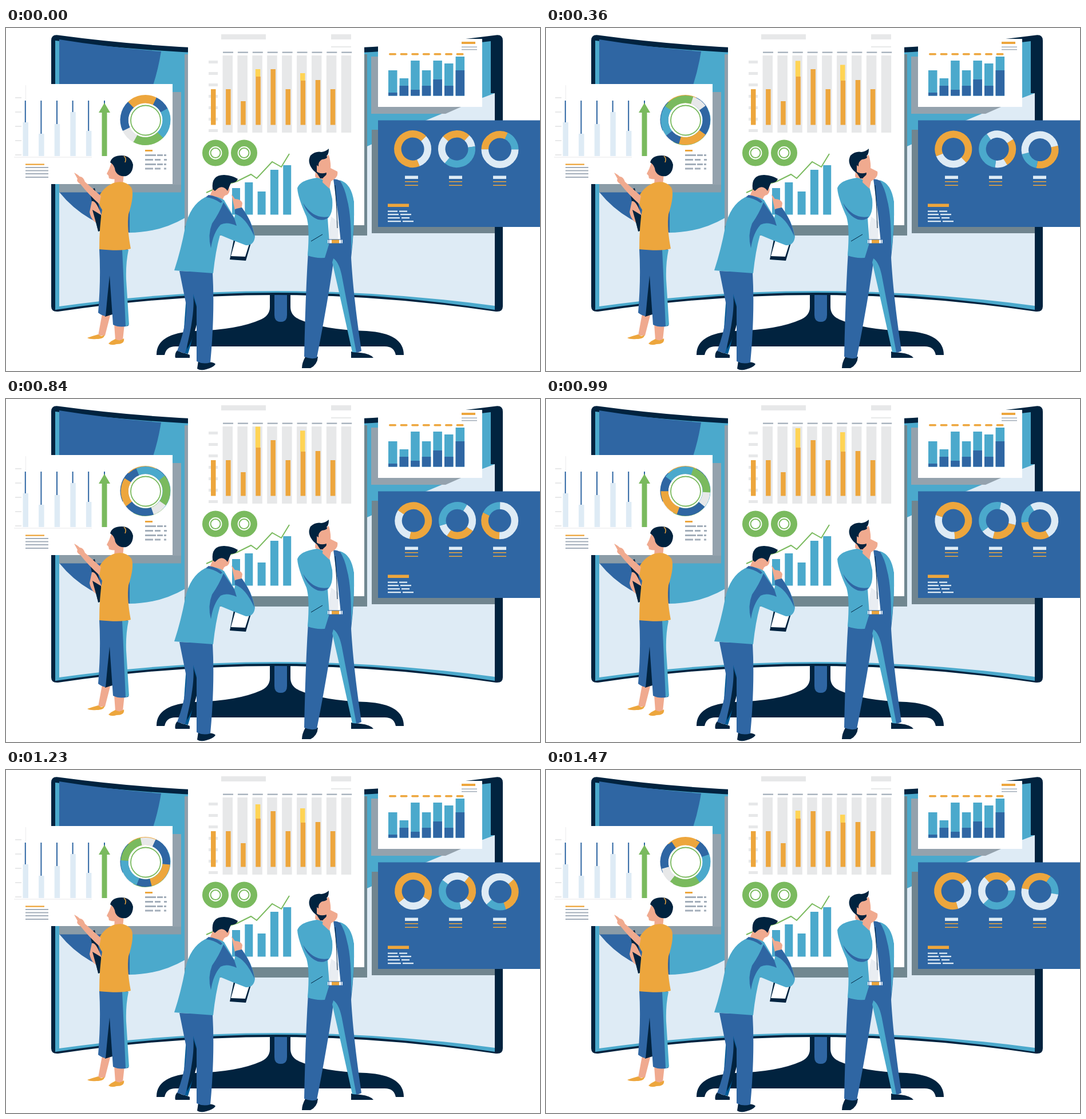
Animation of 933 by 600 pixels, one loop 1500 ms. Source, as an HTML page:

```html
<!DOCTYPE html>
<html lang="en">
<head>
<meta charset="utf-8">
<title>Dashboard team</title>
<style>
html, body { margin: 0; width: 100%; height: 100%; overflow: hidden; background: #fff; }
svg { display: block; width: 933px; height: 600px; }
</style>
</head>
<body>
<svg id="stage" viewBox="0 0 933 600"></svg>
<script>
const NAVY = '#01233f', BLUE = '#2f66a3', TEAL = '#4ba9cc', PALE = '#deebf5', ORANGE = '#eda63d',
  YELLOW = '#ffd455', GREEN = '#7aba5e', GREY = '#a3aeba', LIGHT = '#e7e8e9', SKIN = '#f0aa8f', WHITE = '#fff';

const stage = document.getElementById('stage');
let out = '';
const rect = (x, y, w, h, fill, extra = '') =>
  out += `<rect x="${x}" y="${y}" width="${w}" height="${h}" fill="${fill}" ${extra}/>`;
const path = (fill, d) => out += `<path fill="${fill}" d="${d}"/>`;
const line = (color, width, d) =>
  out += `<path fill="none" stroke="${color}" stroke-width="${width}" d="${d}"/>`;
const ring = (x, y, r, width, color, extra = '') =>
  out += `<circle cx="${x}" cy="${y}" r="${r}" fill="none" stroke="${color}" stroke-width="${width}" ${extra}/>`;
const rows = (x, w, color, height, ys) => ys.forEach(y => rect(x, y, w, height, color));

// Segments are [colour, start angle], clockwise from the top.
function donut(x, y, outer, inner, segments, id = '') {
  out += `<g id="${id}">`;
  segments.forEach(([color, start], i) => {
    const end = segments[(i + 1) % segments.length][1];
    const sweep = (end - start + 360) % 360 + 0.5;
    ring(x, y, (outer + inner) / 2, outer - inner, color,
      `pathLength="360" stroke-dasharray="${sweep} 360" transform="rotate(${start - 90} ${x} ${y})"`);
  });
  out += '</g>';
}

function drawMonitor() {
  rect(461, 460, 36, 60, NAVY);
  path(NAVY, 'M263 572Q262 534 330 530Q405 528 445 510Q461 503 461 488H497Q497 503 513 510Q555 528 630 530Q695 534 695 572H681Q678 557 662 557H296Q280 557 277 572Z');
  path(BLUE, 'M469 466H491V502Q491 514 480 514Q469 514 469 502Z');
  path(NAVY, 'M79 22Q79 11 91 12.500Q280 38 473 38T856 12.500Q868 11 868 22V487Q868 497 856 496Q660 467 473 467T91 496Q79 497 79 487Z');
  path(TEAL, 'M86 22Q290 47 473 47T847 23V114H854V493Q660 463 473 463T86 493Z');
  path(PALE, 'M93 270L313 300L631 207Q745 154 854 114V486Q660 460 473 460T93 487Z');
  path(TEAL, 'M200 285H313V332Q268 358 215 358Z');
  path(BLUE, 'M93 20Q180 34 271 41Q266 72 257 100H93Z');
  path(BLUE, 'M93 287H216V358Q140 345 93 287Z');
}

function drawLeftPanel() {
  rect(93, 112, 213, 175.500, '#8b9ca7');
  rect(291, 112, 15, 162, '#94a2ad');
  rect(0, 98, 291, 175, WHITE);
  rows(16, 11, LIGHT, 2, [121, 146, 171, 196, 221]);
  rect(14, 225.500, 136, 1, LIGHT);
  rect(34, 100, 0.800, 26, LIGHT);
  [165, 185, 168, 147, 180].forEach((y, i) => {
    const x = 29.500 + i * 27.600;
    rect(x, y, 9.500, 224 - y, PALE);
    rect(x + 3.300, 127, 2, y - 127, BLUE);
  });
  rect(171, 127, 2, 6, BLUE);
  path(GREEN, 'M172 131L182 148H176.500V224H167.500V148H162Z');
  rect(34, 237.500, 33, 2.300, ORANGE);
  rows(34, 40, GREY, 2, [243, 248.500, 254, 260]);
  rect(243, 213, 13, 3, ORANGE);
  [221, 229, 237, 244.500].forEach((y, i) => {
    rect(243, y, 19 - i % 2 * 5, 3, GREY);
    rect(264 - i % 2 * 4, y, 10, 3, GREY);
    rect(276, y, i === 1 ? 5 : 4, 3, GREY);
  });
  const parts = [[ORANGE, 316], [BLUE, 26], [TEAL, 62], [GREEN, 135], [LIGHT, 209], [BLUE, 245]];
  donut(243.500, 161, 44, 30, parts);
  donut(243.700, 161.400, 43.200, 30, parts, 'd0');
  ring(244, 161.500, 26, 1.800, GREEN);
}

function drawCentrePanel() {
  rect(312, 46, 319, 317, '#708790');
  rect(312, 46, 6, 300, '#909fab');
  rect(318, 0, 308, 345, WHITE);
  rect(376, 11, 78, 9, LIGHT);
  rect(568, 11, 35, 9, LIGHT);
  rect(568, 32, 35, 2, LIGHT);
  rows(354, 16, LIGHT, 5, [57, 77, 97, 117, 137, 157, 177]);
  const tops = [107, 107, 128, 85, 72, 107, 92, 91, 107];
  tops.forEach((y, i) => {
    rect(379 + i * 25.900, 41.500, 18, 2.300, GREY);
    rect(378.500 + i * 25.900, 48, 17.500, 135, LIGHT);
  });
  tops.forEach((y, i) => rect(358 + i * 26.100, y, 8.500, 169.500 - y, ORANGE));
  rect(435.800, 72, 8.500, 13, YELLOW, 'id="b0"');
  rect(514, 79, 8.500, 13, YELLOW, 'id="b1"');
  [366, 416].forEach(x => {
    ring(x, 218.500, 17.200, 11.600, GREEN);
    ring(x, 218.500, 8.500, 2, GREEN);
  });
  [280, 270, 286, 248, 240].forEach((y, i) => rect(395 + i * 22.300, y, 14, 326.500 - y, TEAL));
  line(GREEN, 2, 'M350 288L372 278L404 268L428 256L438 263L465 234L481 243L495 220');
}

function drawRightPanels() {
  path('#94a2ad', 'M638 50H660V138H795L768 150H638Z');
  rect(650, 19, 182, 119, WHITE);
  rect(650, 8, 147, 20, WHITE);
  const tops = [74, 88, 57, 74, 57, 62, 50], splits = [113, 101, 108, 101, 90, 101, 74];
  tops.forEach((y, i) => {
    const x = 668 + i * 19.600;
    rect(x + 1, 44, 13, 3.500, ORANGE, 'rx="1.700"');
    rect(x, y, 15.500, 118.500 - y, TEAL);
    rect(x, splits[i], 15.500, 118.500 - splits[i], BLUE);
  });
  rect(796, 24, 24, 4, ORANGE);
  rows(796, 27, GREY, 1.500, [32.500, 37]);
  rect(639, 178, 215, 181, '#71858f');
  rect(650, 161.500, 283, 186.500, BLUE);
  donut(710.600, 211.600, 32.500, 20, [[PALE, 46], [ORANGE, 158]], 'd1');
  donut(787.500, 211.600, 32.500, 20, [[ORANGE, 312], [PALE, 43], [TEAL, 82], [PALE, 220]], 'd2');
  donut(863, 212.500, 32.500, 20, [[ORANGE, 270], [TEAL, 25], [PALE, 90]], 'd3');
  [697, 774, 851].forEach(x => {
    rect(x, 258.500, 23, 5.500, PALE);
    rows(x, 23, ORANGE, 1.500, [268, 274.500]);
  });
  rect(667, 307.500, 37, 5.500, ORANGE);
  [319.500, 325, 331, 337].forEach((y, i) => {
    rect(667, y, 17 + i * 2, 2.300, PALE);
    rect(687 + i * 2, y, i % 2 ? 19 : 14, 2.300, PALE);
  });
}

function drawWoman() {
  path(SKIN, 'M168 500L182 503L173 538L161 538Z M189 518H207L204 546L191 546Z');
  path(ORANGE, 'M161 536Q166 541 172 537Q172 544 158 544Q147 545 142 542Q150 539 161 536Z M191 544Q199 549 206 543Q208 553 193 553Q184 556 179 552Q184 547 191 544Z');
  path(NAVY, 'M172 425H190L186 501L173 505Z');
  path(BLUE, 'M163 386H213L206 430L214 521Q198 525 187 519L181 433Q177 470 174 504Q167 503 161 498Q166 440 163 386Z');
  path(TEAL, 'M203 388H214Q209 412 210 440L215 519L209 522L205 430Z');
  path(NAVY, 'M146 284L155 280L171 353L161 356Z');
  path(SKIN, 'M150 303Q157 300 168 330L170 345Q150 343 146 322Z');
  path(NAVY, 'M151 318L166 327L170 353L160 351Z');
  path(SKIN, 'M190 260L206 255L204 275L189 274Z');
  path(ORANGE, 'M188 271Q208 265 219 279Q225 292 214 326Q211 350 218 386Q202 391 163 387Q163 346 168 318Q162 309 160 300Q168 279 188 271Z');
  path(SKIN, 'M119 253Q125 256 129 260Q135 260 138 269L166 294L163 308Q145 292 130 273Q122 268 125 264Z');
  path(SKIN, 'M184 236L201 240L200 261Q193 267 180 263L179 258L176 255Q181 246 184 236Z');
  path(NAVY, 'M182 235Q185 223 202 223Q218 223 222 239Q222 254 210 259Q196 261 191 250Q190 240 182 235Z');
  line(ORANGE, 1.500, 'M206 224Q211 228 208 235');
}

function drawLeaningMan() {
  path(NAVY, 'M299 564L308 568Q318 570 321 572V577H296Q294 570 299 564Z M336 582L349 585Q362 583 366 588Q362 594 350 597Q340 600 334 596Z');
  path('#015b96', 'M318 427H338Q340 500 318 570L308 568Z');
  path(NAVY, 'M324 460L337 500Q330 540 316 562Z');
  path(BLUE, 'M303 425L361 427Q365 500 357 585Q345 589 333 583L333 485L327 465Q331 500 313 569L299 565Q316 520 315 485Z');
  path(NAVY, 'M400 360L428 376L419 407L391 405Z');
  path(WHITE, 'M403 363L425 378L418 400L393 399Z');
  path(SKIN, 'M362 280L388 275Q394 286 386 292Q380 292 378 303L356 294Z');
  path(NAVY, 'M361 282Q358 257 381 257Q396 258 405 264Q403 271 393 271Q390 278 387 285Q380 275 371 280L365 285Z');
  path(SKIN, 'M394 291L400 299Q410 299 413 306L411 320L400 319Z');
  path(TEAL, 'M348 296Q365 291 381 301L399 332L402 316L412 314Q430 337 435 365Q433 381 419 380Q395 371 374 362Q366 390 362 429L294 424Q306 387 313 349Q321 310 348 296Z');
  path(BLUE, 'M380 305L399 333L403 346Q386 338 375 344Q362 358 358 385Q352 362 360 342Q372 325 380 305Z');
  path(BLUE, 'M349 296L354 292Q370 294 378 304L375 306Q362 297 349 296Z M400 317L412 314Q431 340 434 365Q419 331 400 325Z');
}

function drawThinkingMan() {
  path(NAVY, 'M523 575H545Q544 589 532 595H517Q517 586 523 575Z M603 566L619 568Q637 570 642 577H603Z');
  path(BLUE, 'M528 390L545 377H602Q604 450 621 565Q614 569 606 567L572 410Q562 480 543 577Q533 580 521 575Q523 470 528 390Z');
  path(TEAL, 'M572 403Q583 410 588 440L612 567L605 567Q586 480 570 410Z');
  path(WHITE, 'M552 264L578 265L587 372L560 374Z');
  path('#e9edf2', 'M568 330L582 340L580 369L561 371Z');
  path(BLUE, 'M572 264Q599 266 608 305Q609 350 603 402L586 385L580 325Z');
  path(TEAL, 'M583 266Q604 272 608 305Q609 350 603 394Q604 330 596 300Q592 280 583 266Z');
  path(SKIN, 'M542 235L564 222Q568 236 567 245L579 251Q581 261 570 265L551 270L540 260Z');
  path(NAVY, 'M540 249Q548 257 560 253L559 263L549 263Z');
  path(NAVY, 'M538 250Q525 236 532 223Q541 215 551 217Q559 216 564 211Q564 221 560 224Q564 228 552 230Q545 234 546 242L543 240L543 254Z');
  path(TEAL, 'M543 262Q558 264 565 278L570 299Q572 325 562 333L565 376L557 402Q540 403 527 398Q531 350 525 330Q510 297 509 280Q514 266 543 262Z');
  path(SKIN, 'M554 262Q568 247 579 253Q580 262 568 268L565 281L553 270Z');
  path(BLUE, 'M519 306Q537 335 564 330Q558 338 545 335Q527 328 519 306Z');
  line(NAVY, 1, 'M533 373L553 361M575 275Q578 310 579 350');
  rect(562, 370, 26, 7, WHITE);
  rect(569, 370, 13, 7, ORANGE);
  line(BLUE, 1, 'M562 370H588M562 377H588M564 370V377M586 370V377');
}

drawMonitor();
drawLeftPanel();
drawCentrePanel();
drawRightPanels();
drawWoman();
drawLeaningMan();
drawThinkingMan();
stage.innerHTML = out;

const spinners = [[280, 243.7, 161.3], [148, 711, 212.4], [174, 788, 212.2], [275, 863, 212.8]]
  .map(([turn, x, y], i) => ({ el: document.getElementById('d' + i), turn, x, y }));
const growers = [[72, 85], [79, 92]]
  .map(([top, base], i) => ({ el: document.getElementById('b' + i), top, base }));

// Out and back around 766 ms, starting quicker than it settles.
function progress(t) {
  const u = Math.max(0, Math.min(1, (736 - Math.abs(t - 766)) / 736)) ** 0.7;
  return u * u * (3 - 2 * u);
}

function frame(now) {
  const p = progress(Math.floor(now / 30) * 30 % 1500);
  for (const { el, turn, x, y } of spinners) el.setAttribute('transform', `rotate(${turn * p} ${x} ${y})`);
  for (const { el, top, base } of growers) {
    const y = top - 24 * p;
    el.setAttribute('y', y);
    el.setAttribute('height', base - y);
  }
  requestAnimationFrame(frame);
}
frame(performance.now());
</script>
</body>
</html>
```
